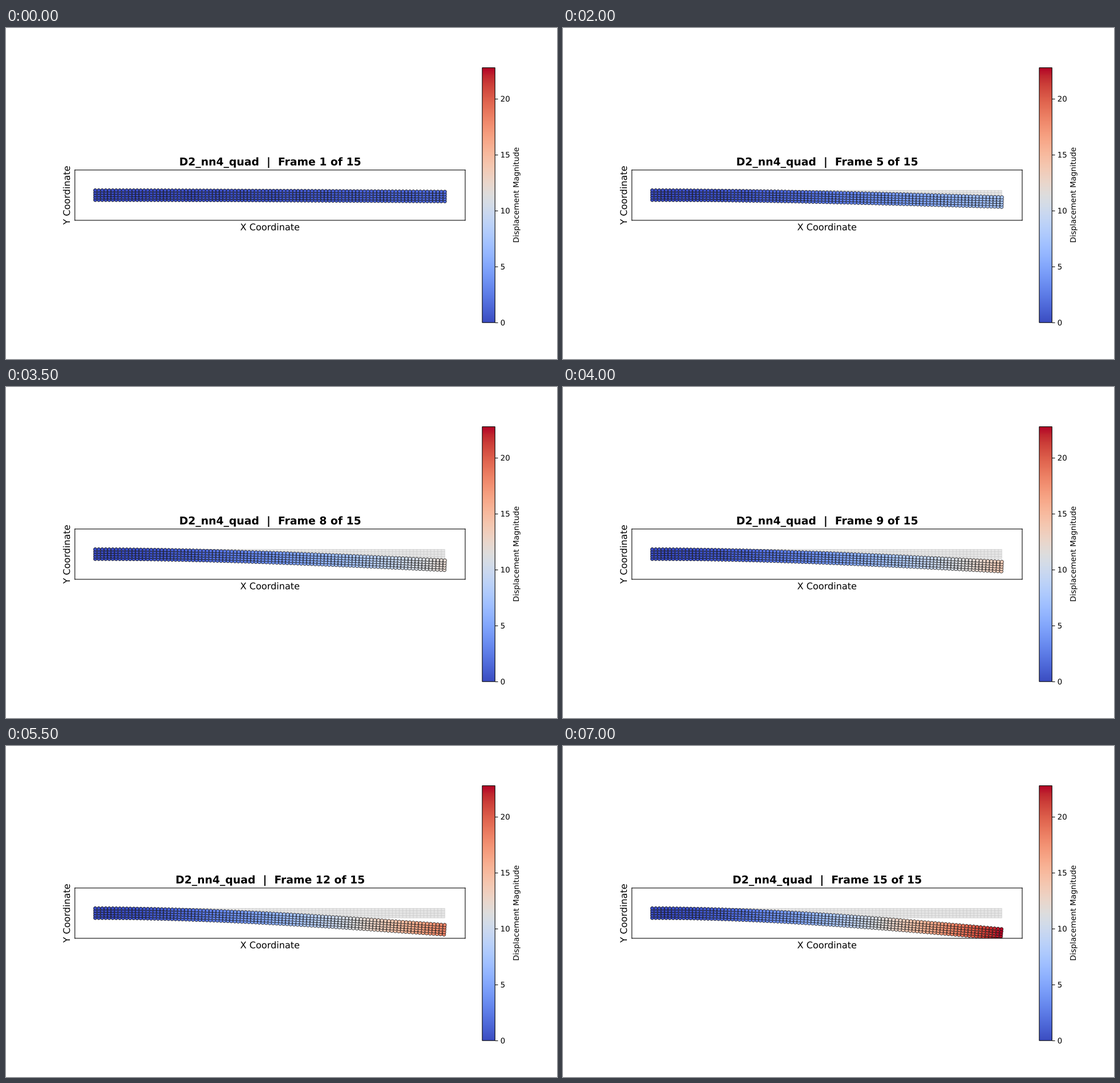
These frames come from a looping animation (966 by 580 pixels, 7.5 s). A matplotlib script:

```python
import numpy as np
import matplotlib.pyplot as plt
from matplotlib.animation import FuncAnimation
from matplotlib.collections import PolyCollection
from matplotlib.patheffects import Normal
from matplotlib.text import Text

# Sub-pixel placement of lines and glyphs
plt.rcParams.update({"path.snap": False, "text.hinting": "none"})

DPI = 96.6
STEPS = 15
VMAX = 22.77              # tip displacement at full load
SCALE = 36.4 / VMAX       # pixels per length unit
LENGTH, HEIGHT, PAD = 612.7 / SCALE, 16.7 / SCALE, 35.7 / SCALE
COLS, ROWS = 101, 5

s = np.linspace(0, LENGTH, COLS)
eta = np.linspace(0, HEIGHT, ROWS)
X, Y = np.meshgrid(s, eta)


def integrate(f):
    """Running trapezoid integral along the beam axis."""
    return np.concatenate([[0], np.cumsum((f[1:] + f[:-1]) / 2 * np.diff(s))])


def deform(load):
    """Node positions of a tip-loaded cantilever, load in 0..1."""
    slope = 1.5 * (1 - (1 - s / LENGTH) ** 2)
    theta = np.arctan(load * VMAX / LENGTH * slope)
    off = Y - HEIGHT / 2
    x = integrate(np.cos(theta)) + off * np.sin(theta)
    y = HEIGHT / 2 - integrate(np.sin(theta)) + off * np.cos(theta)
    return x, y


def quads(x, y):
    corners = [(x[:-1, :-1], y[:-1, :-1]), (x[:-1, 1:], y[:-1, 1:]),
               (x[1:, 1:], y[1:, 1:]), (x[1:, :-1], y[1:, :-1])]
    return np.stack([np.column_stack([a.ravel(), b.ravel()])
                     for a, b in corners], axis=1)


fig, ax = plt.subplots(figsize=(966.01 / DPI, 580.01 / DPI), dpi=DPI)
ax.add_collection(PolyCollection(quads(X, Y), facecolor="0.9",
                                 edgecolor="0.8", linewidth=0.5, zorder=0.5))
nodes = ax.scatter(X.ravel(), Y.ravel(), c=np.zeros(X.size), s=20,
                   cmap="coolwarm", vmin=0, vmax=VMAX,
                   edgecolors="k", linewidths=0.5)
bar = fig.colorbar(nodes, ax=ax, fraction=0.046, pad=0.04)
bar.set_label("Displacement Magnitude")

ax.set_aspect("equal")
ax.set_xlim(-PAD, LENGTH + PAD)
ax.set_ylim(-PAD, HEIGHT + PAD)
ax.set_xticks([])
ax.set_yticks([])
ax.set_xlabel("X Coordinate", fontsize=12)
ax.set_ylabel("Y Coordinate", fontsize=12)
title = ax.set_title("", fontsize=14, fontweight="bold")
for label in fig.findobj(Text):
    label.set_path_effects([Normal()])


def update(i):
    x, y = deform((i + 1) / STEPS)
    nodes.set_offsets(np.column_stack([x.ravel(), y.ravel()]))
    nodes.set_array(np.hypot(x - X, y - Y).ravel())
    title.set_text(f"D2_nn4_quad  |  Frame {i + 1} of {STEPS}")
    return nodes, title


anim = FuncAnimation(fig, update, frames=STEPS, interval=500,
                     repeat=True, repeat_delay=0, blit=False)
plt.show()
```
